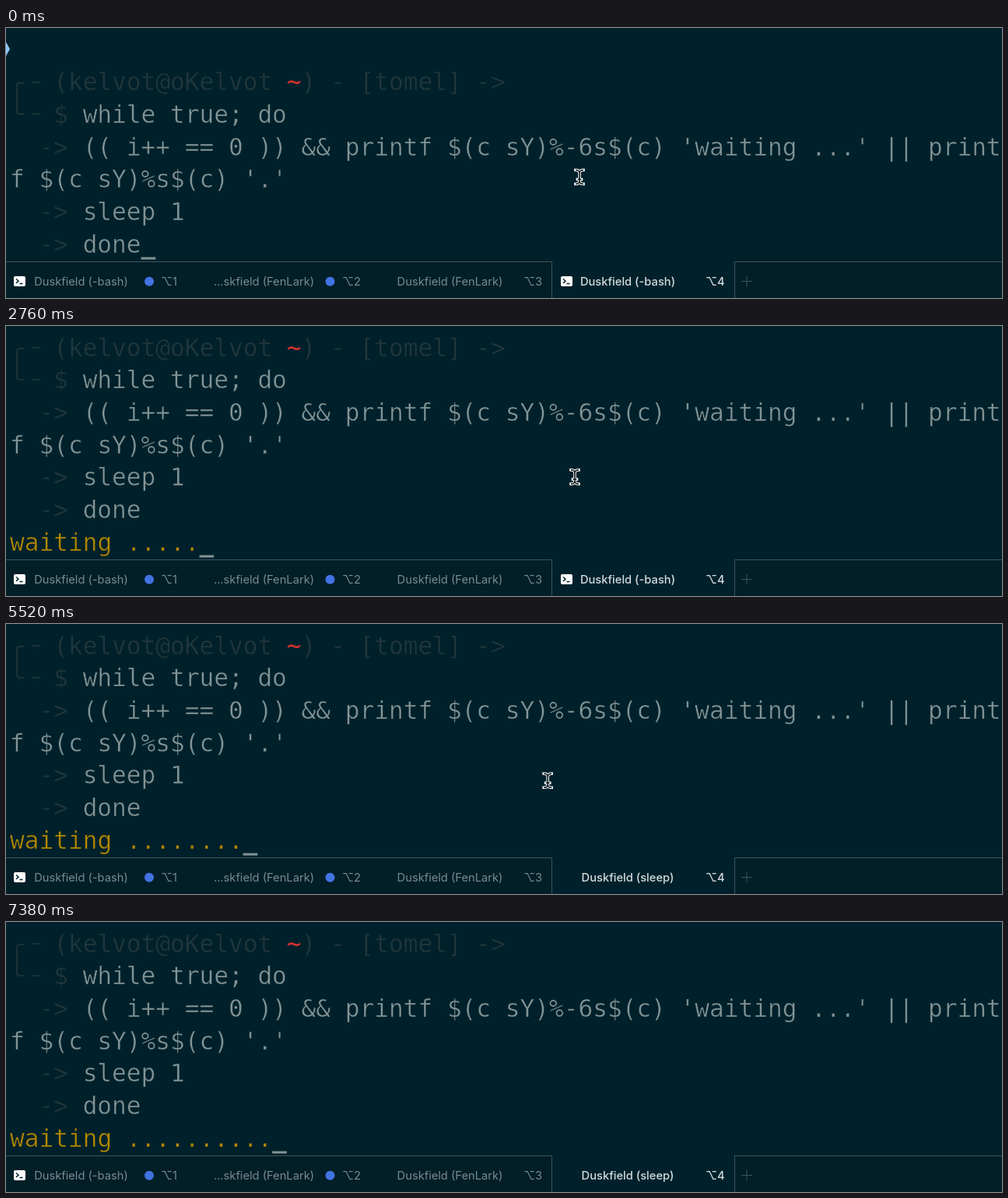
Animation, 1280 px wide and 347 px high, one loop 7.44 s. Source, as an HTML page:

```html
<!DOCTYPE html>
<html lang="en">
<head>
<meta charset="utf-8">
<title>Terminal</title>
<style>
  html, body { margin: 0; width: 100%; height: 100%; overflow: hidden; background: #00212b; }
  svg { display: block; width: 100vw; height: 100vh; }
  text { white-space: pre; }
  /* a thin background stroke slims the letters */
  .term { font: 31.11px "DejaVu Sans Mono", monospace; fill: #839496; stroke: #00212b; stroke-width: .45px; }
  .term .dim { fill: #22373d; }
  .term .red { fill: #dc322f; stroke: none; }
  .term .yellow { fill: #b58900; }
  .tabs { font: 14.7px Inter, "DejaVu Sans", sans-serif; fill: #788b8f; }
  .tabs .title { text-anchor: middle; }
  .tabs .on { fill: #d3dcde; font-weight: 500; }
  .line { fill: none; stroke: #3b545c; }
</style>
</head>
<body>
<svg viewBox="0 0 1280 347" preserveAspectRatio="none">
  <defs>
    <g id="icon">
      <rect width="15" height="13" rx="2" fill="#fff"/>
      <path d="M3 3.5l3 2.7-3 2.7M7.5 9.5h4" fill="none" stroke="#00212b" stroke-width="1.5"/>
    </g>
    <path id="beam" d="M-5-9Q0-9 0-5Q0-9 5-9M0-6V6M-5 9Q0 9 0 5Q0 9 5 9M-2.5 3H2.5" fill="none"/>
  </defs>

  <path id="chevron" d="M0 18L5 27L0 36Z" fill="#8ec5fb"/>
  <g id="screen" class="term">
    <path d="M24 29H18Q14 29 14 33V66Q14 69 18 69H24M34 28H44M34 69H44" style="fill:none;stroke:#22373d;stroke-width:1.6px"/>
  </g>
  <g class="term"><text id="wait" class="yellow" x="5" y="288.5"></text></g>
  <rect id="cursor" y="294.5" width="18.7" height="3" fill="#839496"/>

  <g class="tabs">
    <path d="M0 300H701V347H0ZM936 300H1280V347H936Z" fill="#021e27"/>
    <path class="line" d="M0 300.5H701.5V347M936.5 347V300.5H1280M945 325.5H959M952 318.5V332.5"/>
    <use href="#icon" x="10" y="319"/>
    <use id="job" href="#icon" x="713" y="319"/>
    <circle cx="184" cy="325.8" r="6" fill="#4273e3"/>
    <circle cx="416.5" cy="325.8" r="6" fill="#4273e3"/>
    <text class="title" x="96.5" y="331">Duskfield (-bash)</text>
    <text class="title" x="331.5" y="331">...skfield (FenLark)</text>
    <text class="title" x="570.5" y="331">Duskfield (FenLark)</text>
    <text class="title on" id="title" x="799" y="331"></text>
    <text x="199" y="331">⌥1</text>
    <text x="432" y="331">⌥2</text>
    <text x="665" y="331">⌥3</text>
    <text class="on" x="899" y="331">⌥4</text>
    <path id="close" class="line" d="M481 321L491 331M491 321L481 331" opacity=".6"/>
  </g>
  <g id="pointer">
    <use href="#beam" stroke="#fff" stroke-width="3.6" stroke-linecap="square"/>
    <use href="#beam" stroke="#0a1418" stroke-width="1.6"/>
  </g>
</svg>
<script>
const LOOP = 7440, CELL = 18.73, ROW = 41.65;
const ENTER = 240, FIRST = 660, TICK = 925;
const $ = id => document.getElementById(id);
const colX = col => 5 + col * CELL;

function put(row, col, text, cls = "") {
  const el = document.createElementNS("http://www.w3.org/2000/svg", "text");
  el.setAttribute("x", colX(col));
  el.setAttribute("y", 38.7 + row * ROW);
  el.setAttribute("class", cls);
  el.textContent = text;
  $("screen").append(el);
}

put(0, 3, "(kelvot@oKelvot", "dim");
put(0, 19, "~", "red");
put(0, 20, ") - [tomel] ->", "dim");
put(1, 3, "$", "dim");
for (const row of [2, 4, 5]) put(row, 2, "->", "dim");
put(1, 5, "while true; do");
put(2, 5, "(( i++ == 0 )) && printf $(c sY)%-6s$(c) 'waiting ...' || print");
put(3, 0, "f $(c sY)%s$(c) '.'");
put(4, 5, "sleep 1");
put(5, 5, "done");

const show = (id, on) => $(id).setAttribute("visibility", on ? "visible" : "hidden");

function draw(t) {
  const typed = t < ENTER;
  const dots = t < FIRST ? 0 : 3 + Math.floor((t - FIRST) / TICK);
  const out = dots ? "waiting " + ".".repeat(dots) : "";
  $("screen").setAttribute("transform", `translate(0 ${typed ? ROW : 0})`);
  $("wait").textContent = out;
  $("cursor").setAttribute("x", colX(typed ? 9 : out.length));
  show("chevron", typed);

  $("title").textContent = `Duskfield (${t < 3540 ? "-bash" : "sleep"})`;
  show("job", t < 3420);
  show("close", t >= 5640 && t < 6000);

  // the pointer hides on Enter, returns, then leaves past the bottom edge
  const k = Math.min(1, Math.max(0, (t - 5460) / 300));
  const [x, y] = typed ? [737, 191.5] : [731 - 171 * k, 194 + 176 * k * k];
  $("pointer").setAttribute("transform", `translate(${x} ${y})`);
  show("pointer", typed || t >= 1260 && k < 1);
}

const start = performance.now();
function frame(now) {
  draw(Math.max(0, now - start) % LOOP);
  requestAnimationFrame(frame);
}
draw(0);
requestAnimationFrame(frame);
</script>
</body>
</html>
```
